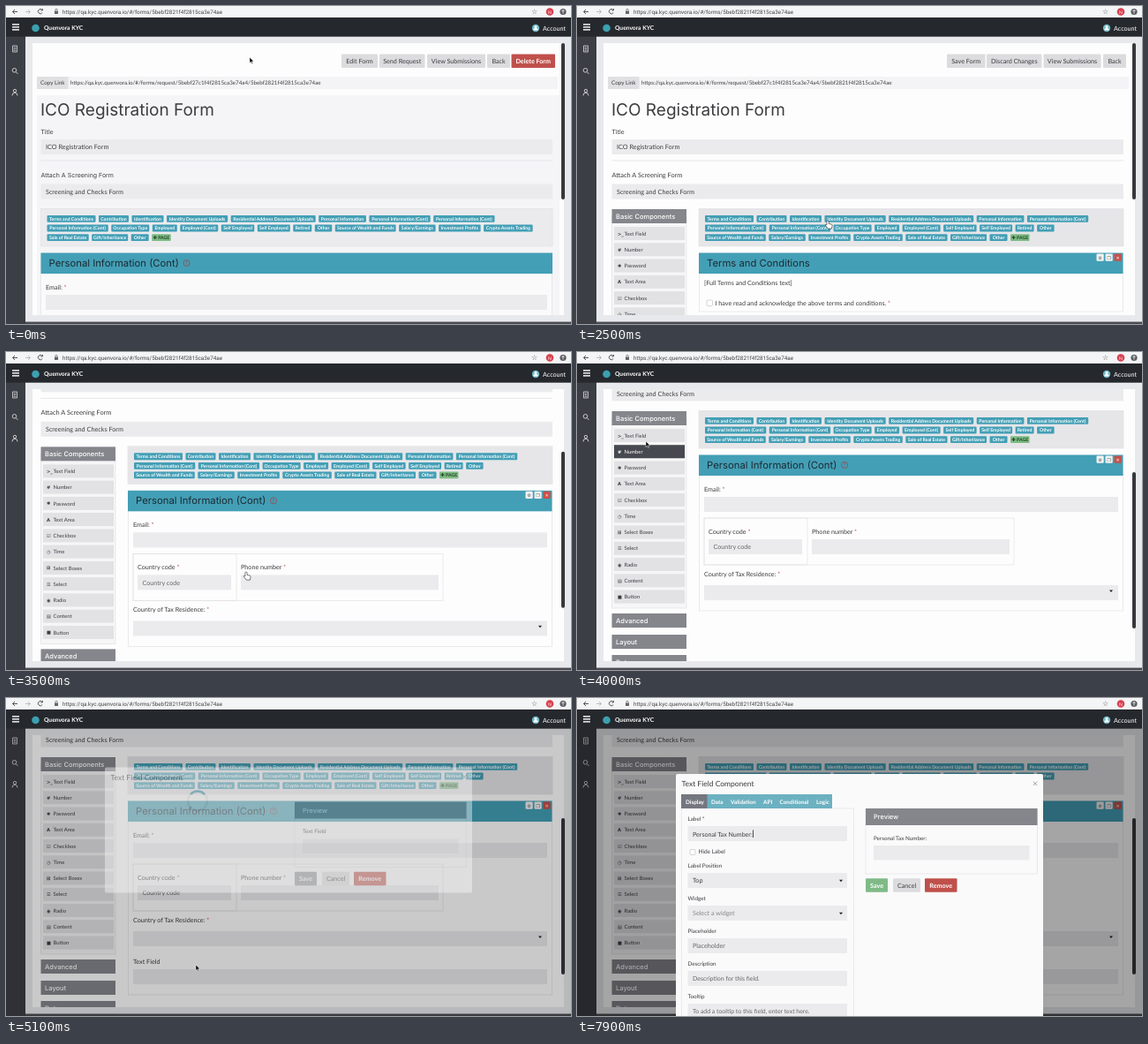
An HTML page that plays this animation: 640 by 360 pixels, repeating every 8000 ms.

```html
<!DOCTYPE html>
<html lang="en">
<head>
<meta charset="utf-8">
<title>Form editor</title>
<style>
html, body { margin: 0; width: 100%; height: 100%; overflow: hidden; background: #e8e9ec; }
svg { display: block; width: 100vw; height: 100vh; }
text { font-family: Lato, sans-serif; white-space: pre; text-rendering: geometricPrecision; }
.h { font-family: Inter, sans-serif; }
.u { font-family: Roboto, sans-serif; }
.i { font-family: "DejaVu Sans", sans-serif; }
.b { font-weight: 700; }
.m { font-weight: 500; }
</style>
</head>
<body>
<svg id="stage" viewBox="0 0 640 360"></svg>
<script>
const TEAL = '#439fb6', GREY = '#85868c', FIELD = '#ebebed', INK = '#3d3d40', RED = '#c0504b', LINE = '#e2e2e5';
const GREEN = '#7fba86', HOST = 'https://qa.kyc.quenvora.io/#/forms/', ID = '5bebf2821f4f2815ca3e74ae';

// Drawing helpers
const T = (x, y, s, size = 7.2, fill = INK, cls = '', more = '') =>
  `<text x="${x}" y="${y}" font-size="${size}" fill="${fill}" class="${cls}" ${more}>${s}</text>`;
const R = (x, y, w, h, fill, more = '') =>
  `<rect x="${x}" y="${y}" width="${w}" height="${h}" fill="${fill}" ${more}/>`;
const box = (x, y, w, h, fill = 'none') => R(x, y, w, h, fill, `stroke="${LINE}" stroke-width=".7"`);
const P = (d, stroke, w = 1, fill = 'none') =>
  `<path d="${d}" stroke="${stroke}" stroke-width="${w}" fill="${fill}"/>`;
const C = (x, y, r, fill, more = '') => `<circle cx="${x}" cy="${y}" r="${r}" fill="${fill}" ${more}/>`;
const G = (id, body, more = '') => `<g id="${id}" ${more}>${body}</g>`;
const star = `<tspan fill="${RED}"> *</tspan>`;
const button = (x, w, y, s, fill = '#dcdcdf', ink = INK, cls = '', more = '') =>
  R(x, y, w, 15.5, fill, 'rx="1" ' + more) + T(x + w / 2, y + 10.3, s, 7.2, ink, cls, 'text-anchor="middle"');
const field = (x, y, w, s = '', ink = INK, size = 7.2) => R(x, y, w, 17, FIELD) + T(x + 5.5, y + 11.3, s, size, ink);
const arrowDown = (x, y) => P(`M${x - 2},${y}h4l-2,2.4z`, 'none', 0, '#222');
const heading = (x, w, s, help) => R(x, 279.5, w, 23.5, TEAL) + T(x + 9, 295, s, 11.3, '#1d2b33', 'h') +
  (help ? C(x + 165, 291, 3.6, 'none', 'stroke="#8d5358" stroke-width=".9"') +
    T(x + 165, 293.4, '?', 6, '#8d5358', 'b', 'text-anchor="middle"') : '');

// Page tags: label and the advance to the next one
const cont = ['Personal Information (Cont)', 72.8];
const tagList = [['Terms and Conditions', 58.5], ['Contribution', 37.5], ['Identification', 39.5],
  ['Identity Document Uploads', 72.7], ['Residential Address Document Uploads', 99.5],
  ['Personal Information', 57.2], cont, cont, cont, ['Occupation Type', 46.5], ['Employed', 31.5],
  ['Employed (Cont)', 46.5], ['Self Employed', 41], ['Self Employed', 40.5], ['Retired', 24.5], ['Other', 23],
  ['Source of Wealth and Funds', 72.3], ['Salary/Earnings', 45], ['Investment Profits', 51],
  ['Crypto Assets Trading', 59], ['Sale of Real Estate', 50.7], ['Gift/Inheritance', 44.5],
  ['Other', 23.5], ['✚ PAGE', 25]];
function tags(left, breaks) {
  let x = left, y = 237, out = '';
  tagList.forEach(([s, step], i) => {
    if (breaks.includes(i)) { x = left; y += 10.6; }
    const page = i === tagList.length - 1, w = step - 3.5;
    out += R(x, y, w, 7.8, page ? '#7dbb82' : TEAL, 'rx="1"') +
      T(x + w / 2, y + 5.8, s, 5.2, page ? '#24452a' : '#fff', 'b', 'text-anchor="middle"');
    x += step;
  });
  return out;
}

// Component palette
const items = ['Text Field', 'Number', 'Password', 'Text Area', 'Checkbox', 'Time', 'Select Boxes', 'Select',
  'Radio', 'Content', 'Button'];
const marks = ['&gt;_', '#', '✱', 'A', '☑', '◷', '⊞', '☰', '◉', '▤', '■'];
const STEP = 18.25;
const item = (i, x, y, fill = '#e2e2e5', ink = INK) => R(x, y, 80, 15, fill) +
  T(x + 4, y + 9.6, marks[i], 5.2, ink, 'i b') + T(x + 11.5, y + 9.7, items[i], 5.9, ink);
const group = (y, s) => R(39.5, y, 84.5, 16, GREY) + T(44, y + 10.7, s, 7.5, '#fff', 'h m');
const palette = box(39.5, 238, 84.5, 215, '#f6f6f7') + group(230, 'Basic Components') +
  items.map((_, i) => item(i, 42, 250 + i * STEP)).join('') +
  group(459, 'Advanced') + group(483, 'Layout') + group(506, 'Data');

const common = R(35, 80, 590, 14, '#f4f4f6') + R(35, 80, 35.5, 14, '#e0e0e3') + T(39, 89.2, 'Copy Link', 6.35) +
  T(73, 89.2, HOST + 'request/5bebf27c1f4f2815ca3e74a4/' + ID, 6.25) +
  T(39, 124, 'ICO Registration Form', 19, INK, 'h') + T(39.5, 144.5, 'Title') +
  field(39.5, 151, 579.5, 'ICO Registration Form', INK, 7.3) + R(39.5, 174.6, 579.5, .8, LINE) +
  field(39.5, 201.5, 579.5, 'Screening and Checks Form', INK, 7.25);

const view = R(35, 101, 592, 330, '#f5f5f7');
const viewTop = button(380, 41, 54.5, 'Edit Form') + button(423, 51.5, 54.5, 'Send Request') +
  button(477, 66, 54.5, 'View Submissions') + button(545, 26, 54.5, 'Back') +
  button(572.5, 49.5, 54.5, 'Delete Form', RED, '#fff', 'b') + T(39.5, 194, 'Attach A Screening Form', 7, INK, 'h') +
  box(39.5, 229.5, 579.5, 42.5, '#ebebee') + tags(46.5, [8, 20]) +
  box(39.5, 280, 579, 180, '#fafafb') + heading(39.5, 579.5, cont[0], true) +
  T(45, 321, 'Email:' + star) + field(45, 327, 568);

const tools = ['#f2f2f2', '#f2f2f2', '#c95049'].map((c, i) => R(588.5 + i * 10, 280.5, 8.2, 8.2, c, 'rx="1"') +
  T(592.6 + i * 10, 286.6, '⚙❐✕'[i], 5, i > 1 ? '#fff' : '#555', 'i', 'text-anchor="middle"')).join('');
const edit = button(419, 43.5, 54.5, 'Save Form') + button(464, 62.5, 54.5, 'Discard Changes') +
  button(528.5, 65, 54.5, 'View Submissions') + button(596, 26, 54.5, 'Back') +
  T(39.5, 194, 'Attach A Screening Form', 7.4) + palette +
  box(138, 229.5, 481, 42.5, '#e6e6e9') + tags(145, [7, 16]) +
  G('terms', box(138.4, 280, 480, 66, '#fdfdfd') + heading(138, 480.5, 'Terms and Conditions') +
    T(144, 316, '[Full Terms and Conditions text]') + R(147, 333, 6.5, 6.5, '#fff', 'rx="1" stroke="#bbb" stroke-width=".6"') +
    T(156.5, 339, 'I have read and acknowledge the above terms and conditions.' + star)) +
  G('personal', R(138.4, 280, 480, 176, '#fdfdfd', `id="panel" stroke="${LINE}" stroke-width=".7"`) +
    heading(138, 480.5, cont[0], true) + T(144, 320.5, 'Email:' + star) + field(144, 327, 469) +
    box(144, 351, 351, 53) + box(144, 351, 117, 53) +
    T(149, 368.5, 'Country code' + star) + field(149, 375, 106, 'Country code', '#666') +
    T(266, 368.5, 'Phone number' + star) + field(266, 375, 224) +
    T(144, 416.5, 'Country of Tax Residence:' + star) + field(144, 427, 469) + arrowDown(605, 432.5) +
    G('added', T(144, 463.5, 'Text Field') + field(144, 470, 469))) + tools;

// Browser bar, navigation and side bar
const chrome = R(0, 0, 640, 13, '#f4f5f6') +
  P('M13,6.5H7.5M10,4L7.5,6.5L10,9', '#555') + P('M22,6.5H27.5M25,4L27.5,6.5L25,9', '#bbb') +
  P('M41,4.5A2.6,2.6 0 1 0 41.2,7.5M41.4,3v2h-2', '#555') +
  R(55, 5.5, 4, 3.5, '#666') + P('M55.8,5.5v-1a1.2,1.2 0 0 1 2.4,0v1', '#666', .7) +
  T(64, 8.8, HOST + ID, 6.3, '#444', 'u') + T(595, 9.2, '☆', 8, '#555', 'i') +
  C(616, 6.5, 4.3, '#d8404f') + T(616, 8.5, 'N', 5, '#fff', '', 'text-anchor="middle"') +
  C(631, 6.5, 3.6, '#5a5c60') + P('M631,8.6v-4M629.4,6L631,4.4L632.6,6', '#fff', .8);
const person = (x, y, c) => C(x, y - 2, 1.7, 'none', `stroke="${c}" stroke-width=".9"`) +
  P(`M${x - 3},${y + 3.5}q0,-3.3 3,-3.3t3,3.3`, c, .9);
const side = R(0, 13, 22, 347, '#3b3e45') +
  P('M7.5,45h5v7h-5zM8.7,47h2.6M8.7,48.7h2.6M8.7,50.3h2.6', '#d5d7db', .8) +
  C(9.5, 72.8, 2.3, 'none', 'stroke="#d5d7db" stroke-width=".9"') + P('M11.2,74.6l2.2,2.2', '#d5d7db') +
  person(10, 98, '#d5d7db');
const nav = R(0, 13, 640, 21.7, '#25282d') +
  [20.9, 23.9, 26.9].map(y => R(7, y - .7, 8, 1.4, '#fff')).join('') +
  C(33.5, 25, 4.3, '#3ba0b0') + T(43, 27.4, 'Quenvora KYC', 6.7, '#fff', 'b') +
  C(600, 25, 4.2, '#6fb9c6') + C(600, 23.5, 1.5, '#fff') + P('M597.3,27.5q0,-2.4 2.7,-2.4t2.7,2.4z', 'none', 0, '#fff') +
  T(608, 27.5, 'Account', 7.2, '#fff');

// Component dialog
const tabs = [['Display', 123], ['Data', 152], ['Validation', 174], ['API', 211], ['Conditional', 229.5], ['Logic', 271]];
const small = (y, s) => T(125.5, y, s, 6.3);
const dialog = R(112, 86, 416, 290, '#fafafb', 'id="sheet" rx="2"') +
  T(118.5, 100.3, 'Text Field Component', 8.5) + P('M516.8,94.6l4.4,4.4m0,-4.4l-4.4,4.4', '#888', .8) +
  box(327, 126, 194.5, 73) + R(327, 125, 194.5, 19, GREY) + T(336, 137, 'Preview', 7.4, '#fff', 'h m') +
  T(336, 160.5, '', 6.3, INK, '', 'id="label"') + R(336, 167, 176.5, 16.5, FIELD) +
  button(327, 25, 204.3, 'Save', GREEN, '#fff', 'b', 'id="save"') + button(358, 31, 204.3, 'Cancel') +
  button(394, 36.5, 204.3, 'Remove', RED, '#fff', 'b') +
  G('spinner', C(0, 0, 11, 'none', 'stroke="#e4e4e6" stroke-width="2.5"') + P('M-8,-7.5A11,11 0 0 1 8,-7.5', TEAL, 2.5)) +
  G('settings', box(118.3, 125, 195, 250) + R(118, 109, 171, 16, '#6cb1c1') + R(118, 109, 29.5, 16, '#74777f') +
    tabs.map(([s, x]) => T(x, 119.5, s, 6.4, '#fff', 'b')).join('') +
    small(139, 'Label *') + field(125.5, 145, 180.5) + R(130.5, 149.3, 30, 9, '#a9cfe0', 'id="selection"') +
    T(131, 156.5, '', 7.1, INK, '', 'id="value"') + R(0, 149.5, .7, 8.5, '#111', 'id="caret"') +
    R(128, 171.5, 6, 6, '#fff', 'rx="1" stroke="#bbb" stroke-width=".6"') + T(137.5, 176.3, 'Hide Label', 6.5) +
    small(192, 'Label Position') + field(125.5, 198, 180.5, 'Top') + arrowDown(299, 205.8) +
    small(229, 'Widget') + field(125.5, 235, 180.5, 'Select a widget', '#888') + arrowDown(299, 242.8) +
    small(266, 'Placeholder') + field(125.5, 272, 180.5, 'Placeholder', '#666') +
    small(303, 'Description') + field(125.5, 309, 180.5, 'Description for this field.', '#666', 7) +
    small(340, 'Tooltip') + field(125.5, 346, 180.5, 'To add a tooltip to this field, enter text here.', '#666', 6.9));

const pointers = G('arrow', P('M0,0v6.6l1.5,-1.4 1,2.3 1,-.4 -1,-2.3h2.1z', '#fff', .5, '#000')) +
  G('hand', P('M0,0c1,0 1.1,.8 1.1,1.6v1.8l3,.7c.9,.2 1.1,1 .9,2l-.6,3h-4l-3,-3.8c-.4,-1 .6,-1.3 1.5,-.5v-3.2c0,-1 .3,-1.6 1.1,-1.6z', '#222', .6, '#fff')) +
  G('beam', P('M-1.5,-4q1.5,0 1.5,1v6q0,1 -1.5,1M1.5,-4q-1.5,0 -1.5,1M0,3q0,1 1.5,1', '#222', .7));

document.getElementById('stage').innerHTML =
  '<clipPath id="port"><rect x="30" y="42" width="603" height="308"/></clipPath>' +
  R(0, 0, 640, 360, '#e8e9ec') + R(30, 42, 602, 308, '#fdfdfd') +
  `<g clip-path="url(#port)">${G('page', G('view', view) + common + G('viewTop', viewTop) + G('edit', edit))}</g>` +
  R(629, 42, 4, 177, '#36383c', 'id="thumb" rx="2"') + R(22, 357.5, 618, 2.5, '#4a4c51') + side +
  G('hover', '') + G('ghost', item(0, -33, -7), 'opacity=".8"') +
  R(0, 13, 640, 347, '#000', 'id="shade"') + nav + G('dialog', dialog) + chrome + G('pointer', pointers);

const $ = id => document.getElementById(id);
const show = (id, on) => { $(id).style.display = on ? '' : 'none'; };
const set = (id, name, v) => $(id).setAttribute(name, v);
const ramp = (t, a, b) => Math.min(1, Math.max(0, (t - a) / (b - a)));
const move = (id, x, y) => set(id, 'transform', `translate(${x},${y})`);

// Pointer stops: time, x, y
const stops = [[0, 276, 58], [250, 276, 58], [850, 400, 61], [1500, 400, 61], [2400, 284, 243], [2520, 284, 243],
  [2700, 272, 249], [3600, 272, 249], [3980, 78, 101], [4020, 78, 101], [4120, 75, 91], [4250, 75, 91],
  [4930, 215, 302], [5400, 215, 302], [5750, 153, 154], [8000, 153, 154]];
function pointerAt(t) {
  const i = stops.findIndex(s => s[0] > t), [a, x, y] = stops[i - 1], [b, X, Y] = stops[i];
  const p = ramp(t, a, b), e = p * p * (3 - 2 * p);
  return [x + (X - x) * e, y + (Y - y) * e];
}

function draw(t) {
  const editing = t >= 1200, personal = t >= 2800, dropped = t >= 4950, typing = t >= 6450;
  const [x, y] = pointerAt(t), scroll = 163 * ramp(t, 3200, 3600);
  show('view', !editing); show('viewTop', !editing); show('edit', editing);
  show('terms', !personal); show('personal', personal); show('added', dropped);
  set('panel', 'height', dropped ? 219 : 176);
  move('page', 0, -scroll);
  set('thumb', 'y', 42 + scroll * 94 / 163);

  const over = t > 3700 && t < 4930 && x < 122 ? Math.round((y + 8 - 94.5) / STEP) : -1;
  $('hover').innerHTML = items[over] ? item(over, 42, 87 + over * STEP, '#46494f', '#fff') : '';
  show('ghost', t > 4250 && !dropped);
  move('ghost', x, y);

  const fade = ramp(t, 5035, 5190), ready = t >= 5320;
  set('shade', 'opacity', .35 * ramp(t, 5000, 5170));
  set('dialog', 'opacity', fade);
  move('dialog', 0, -13 * (1 - fade));
  set('sheet', 'height', ready ? 290 : 142);
  set('save', 'fill', ready ? GREEN : '#94969a');
  show('dialog', fade > 0); show('settings', ready); show('spinner', !ready);
  set('spinner', 'transform', `translate(217,124) rotate(${(t - 5100) * .36})`);

  const label = 'Personal Tax Number:';
  const value = typing ? label.slice(0, Math.floor((t - 6450) / 66) + 1) : 'Text Field';
  $('value').textContent = $('label').textContent = value;
  show('selection', t >= 5880 && !typing);
  show('caret', typing);
  if (typing) set('caret', 'x', 131.3 + $('value').getComputedTextLength());

  const hand = (t > 780 && t < 1200) || (t > 2380 && t < 3640), beam = t > 5720;
  move('pointer', x, y);
  show('hand', hand); show('beam', beam && !typing); show('arrow', !hand && !beam);
}

const start = performance.now();
function loop() {
  draw((performance.now() - start) % 8000);
  requestAnimationFrame(loop);
}
loop();
</script>
</body>
</html>
```
